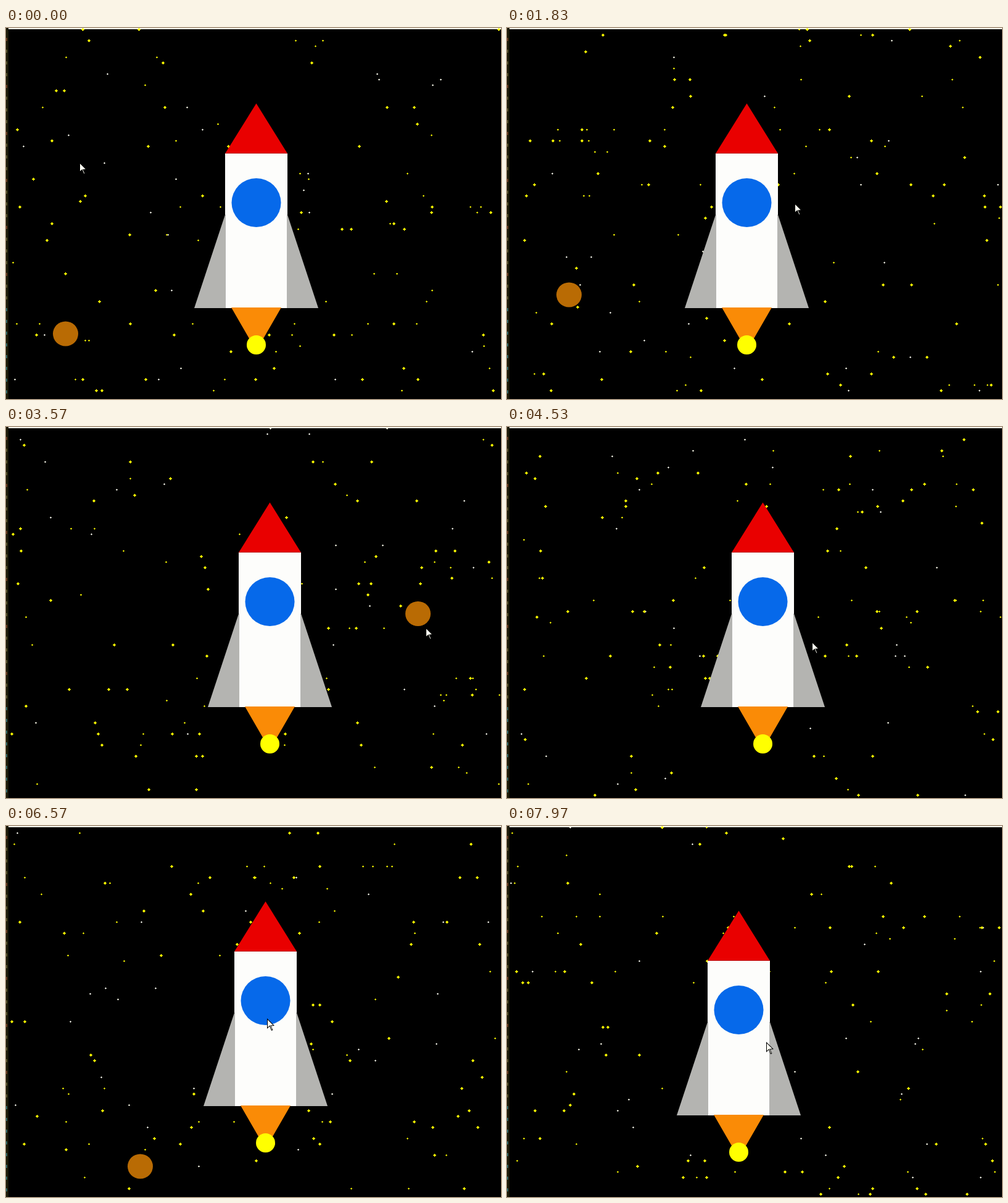
Write an HTML page with a canvas that moves like this. It is 802 px wide and 600 px high and loops after 8000 ms.

```html
<!DOCTYPE html>
<html lang="en">
<head>
<meta charset="utf-8">
<title>Rocket flight</title>
<style>
  html, body { margin: 0; width: 100%; height: 100%; overflow: hidden; background: #000; }
  canvas { display: block; width: 802px; height: 600px; }
</style>
</head>
<body>
<canvas id="stage" width="802" height="600"></canvas>
<script>
const ctx = document.getElementById('stage').getContext('2d');
const LOOP = 8000, STEP = 100 / 3;
const STARS = 138, ROWS = 67, BANDS = 75;

// Pointer stops: [seconds, x, y]
const pointerStops = [[0, 119, 217], [1.13, 277, 197], [2.57, 668, 376], [3.57, 680, 324],
  [5.47, 315, 369], [6.57, 423, 311], [7.97, 420, 349]];
// Planets: [x, tick at which the centre crosses the top edge]
const planets = [[96.5, -70.5], [100.5, 37.5], [667.5, 150], [217.5, 277.5]];

const ticksAt = step => Math.round(step * 1.807);
const clamp01 = v => Math.max(0, Math.min(1, v));

function hash(a, b) {
  let h = Math.imul(a + 1, 374761393) ^ Math.imul(b + 7, 668265263);
  h = Math.imul(h ^ (h >>> 13), 1274126177);
  h = Math.imul(h ^ (h >>> 16), 2246822519);
  return ((h ^ (h >>> 15)) >>> 0) / 4294967296;
}

function rect(color, x, y, w, h) {
  ctx.fillStyle = color;
  ctx.fillRect(x, y, w, h);
}

function poly(color, ...points) {
  ctx.fillStyle = color;
  ctx.beginPath();
  points.forEach(([x, y]) => ctx.lineTo(x, y));
  ctx.closePath();
  ctx.fill();
}

function oval(color, x, y, rx, ry = rx) {
  ctx.fillStyle = color;
  ctx.beginPath();
  ctx.ellipse(x, y, rx, ry, 0, 0, 2 * Math.PI);
  ctx.fill();
}

// Stars share rows, fall one row per tick and get a new x on each pass.
function drawStars(ticks) {
  for (let i = 0; i < STARS; i++) {
    const band = Math.floor(hash(i, 901) * BANDS);
    const row = Math.floor(hash(band, 333) * ROWS) + ticks;
    const x = Math.round(5 + hash(i, Math.floor(row / ROWS)) * 796);
    const y = Math.round(2 + (row % ROWS) * 8.98);
    const kind = hash(i, 555);
    const color = kind > 0.88 ? '#f4f4e4' : '#ffff00';
    const r = kind < 0.54 ? 2 : 1;
    rect(color, x - r, y, 2 * r + 1, 1);
    rect(color, x, y - r, 1, 2 * r + 1);
    if (r === 2) rect(color, x - 1, y - 1, 3, 3);
  }
}

function drawPlanets(ticks) {
  for (const [x, entry] of planets) oval('#b96b04', x, 7 * (ticks - entry) + 1, 20.5, 20);
}

// The rocket sways on a sine and is steered down to the left at the end.
function drawRocket(seconds) {
  const steer = clamp01((seconds - 7.2) / 0.77);
  const x = 404.5 + 30 * Math.sin(1.99 * seconds + 0.05) - 23 * steer;
  ctx.save();
  ctx.translate(Math.floor(x) + 0.5, Math.round(15 * steer));
  rect('#fdfdfb', -50.5, 203, 101, 250);
  for (const side of [-1, 1]) {
    poly('#b4b4b1', [side * 50.5, 302], [side * 100.5, 453], [side * 49.5, 453], [side * 49.5, 302]);
  }
  poly('#e90000', [0, 122], [-50.5, 203], [50.5, 203]);
  rect('#b80000', -50.5, 202, 101, 1);
  oval('#0669ea', 0, 282.5, 40, 39.5);
  poly('#fa8b06', [-40.5, 452], [40.5, 452], [0, 522]);
  oval('#ffff00', 0, 512.5, 15.5);
  ctx.restore();
}

function drawEdges() {
  rect('#f6f6e8', 4, 0, 798, 2);
  rect('#1d1b08', 0, 0, 4, 600);
  for (let y = 16, i = 0; y < 600; y += 19, i++) {
    rect(y > 450 ? '#2f6666' : i % 4 ? '#55502a' : '#6a3a20', 0, y, 2, 5);
  }
}

function drawPointer(seconds) {
  const next = Math.max(1, pointerStops.findIndex(stop => stop[0] > seconds));
  const last = seconds >= 7.97 ? pointerStops.length - 1 : next;
  const [t0, x0, y0] = pointerStops[last - 1], [t1, x1, y1] = pointerStops[last];
  const u = clamp01((seconds - t0) / (t1 - t0)), e = u * u * (3 - 2 * u);
  ctx.save();
  ctx.translate(Math.round(x0 + (x1 - x0) * e), Math.round(y0 + (y1 - y0) * e));
  poly('#000', [0, 0], [0, 17], [4, 13], [7, 20], [9.5, 19], [6.5, 12.5], [12, 12]);
  poly('#fffff4', [1, 2.4], [1, 14.6], [4.4, 11.4], [7.4, 18.6], [8.3, 18.2], [5.2, 11.4], [9.8, 11.2]);
  ctx.restore();
}

function render(now) {
  const step = Math.min(239, Math.floor((now % LOOP + 5) / STEP));
  const seconds = step * STEP / 1000, ticks = ticksAt(step);
  rect('#000', 0, 0, 802, 600);
  drawEdges();
  drawStars(ticks);
  drawPlanets(ticks);
  drawRocket(seconds);
  drawPointer(seconds);
}

const start = performance.now();
function loop() {
  render(performance.now() - start);
  requestAnimationFrame(loop);
}
loop();
</script>
</body>
</html>
```
